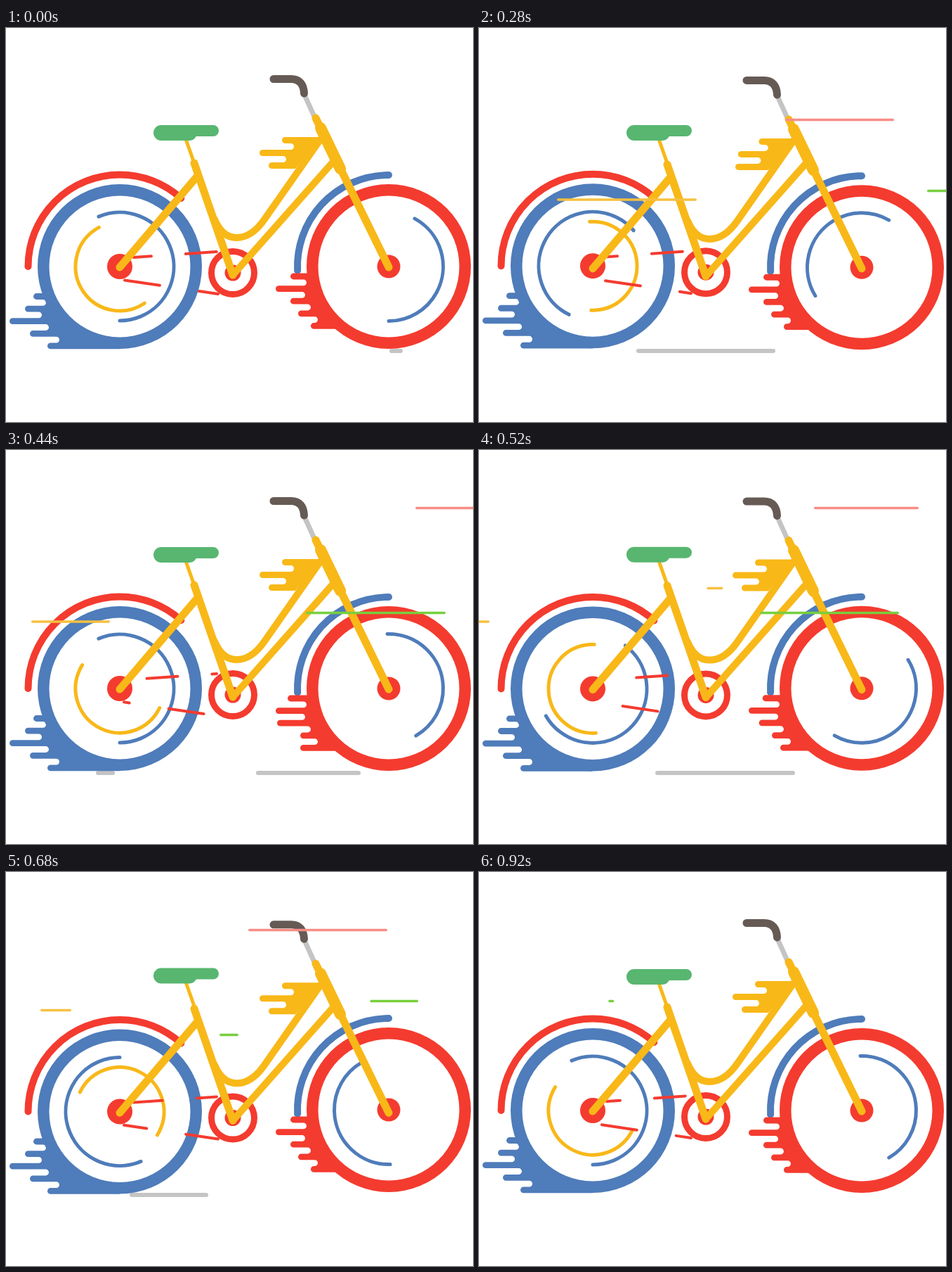
Recreate the animation shown at these times as an HTML page with a canvas. Size 665 px wide and 560 px high, loop 0.96 s.

```html
<!DOCTYPE html>
<html lang="en">
<head>
<meta charset="utf-8">
<title>Speeding bicycle</title>
<style>
  html, body { margin: 0; width: 100%; height: 100%; overflow: hidden; background: #fff; }
  canvas { display: block; }
</style>
</head>
<body>
<canvas width="665" height="560"></canvas>
<script>
const ctx = document.querySelector('canvas').getContext('2d');
const RED = '#f43b2f', BLUE = '#4f7cba', YELLOW = '#f8b818', GREEN = '#58b670',
      GREY = '#c4c4c4', DARK = '#665a55', PINK = '#f78d85', LIME = '#77cf3d', AMBER = '#f6c040';
const STEP = 40, STEPS = 24, HALF = 11, RAD = Math.PI / 180;
ctx.lineCap = ctx.lineJoin = 'round';

function stroke(color, width, path) {
  ctx.strokeStyle = color;
  ctx.lineWidth = width;
  ctx.stroke(new Path2D(path));
}

function arc(color, width, x, y, r, from, to) {
  ctx.beginPath();
  ctx.arc(x, y, r, from * RAD, to * RAD);
  ctx.strokeStyle = color;
  ctx.lineWidth = width;
  ctx.stroke();
}

function disc(color, x, y, r) {
  ctx.fillStyle = color;
  ctx.beginPath();
  ctx.arc(x, y, r, 0, 7);
  ctx.fill();
}

function shifted(dy, draw) {
  ctx.save();
  ctx.translate(0, dy);
  draw();
  ctx.restore();
}

// Piecewise linear value from [time, value] pairs
function at(keys, t) {
  let k = 1;
  while (k < keys.length - 1 && t > keys[k][0]) k++;
  const [t0, v0] = keys[k - 1], [t1, v1] = keys[k];
  return v0 + (v1 - v0) * (t - t0) / (t1 - t0);
}

const pulse = (i, centre, width) => Math.max(0, 1 - Math.abs(i - centre) / width);

// Block with ragged rounded fingers on its left side
function fingers(color, start, end, y, pitch, tips, notches) {
  const r = pitch / 4, q = Math.PI / 2;
  ctx.fillStyle = color;
  ctx.beginPath();
  ctx.moveTo(start, y - r);
  tips.forEach((tip, n) => {
    const cy = y + n * pitch;
    ctx.arc(tip + r, cy, r, -q, q, true);
    if (n < notches.length) ctx.arc(notches[n] - r, cy + pitch / 2, r, -q, q);
  });
  ctx.lineTo(end, y + (tips.length - 1) * pitch + r);
  ctx.fill();
}

function wheel(color, x, y) {
  disc(color, x, y, 117);
  disc('#fff', x, y, 100.5);
}

function chain(path, dash, offset) {
  ctx.setLineDash(dash);
  ctx.lineDashOffset = offset;
  stroke(RED, 4, path);
  ctx.setLineDash([]);
}

// Both ends of a streak as it grows, glides and shrinks
const HEAD = [[-1, 567], [1, 462], [3, 356], [4, 298], [5, 251], [7, 224], [9, 176], [11, 128], [11.6, 114]];
const TAIL = [[-1, 567], [0, 562], [1, 552], [3, 505], [5, 450], [7, 422], [9, 288], [11, 155], [11.6, 114]];
const LATE_HEAD = [[12, 400], [15, 173], [17, 49], [19, -60]];
const LATE_TAIL = [[12, 400], [15, 242], [17, 93], [19, -50]];

function streak(color, width, y, dx, t, head = HEAD, tail = TAIL) {
  if (t < head[0][0] || t > head[head.length - 1][0]) return;
  const a = at(head, t) + dx + width / 2, b = at(tail, t) + dx - width / 2;
  if (b > a) stroke(color, width, `M${a} ${y}H${b}`);
}

function rear(i, blueAngle) {
  const p = pulse(i, 3, 3);
  const tips = [39 - 12 * p, 27 + 9 * p, 5 + 9 * p, 34 - 20 * p, 59 - 9 * p];
  const notches = [57 - 4 * p, 51 + 7 * p, 61 - 2 * p, 76 + 9 * p];
  arc(RED, 10, 162, 339, 130.5, 180, 312);
  fingers(BLUE, 70, 162, 381.5, 17.6, tips, notches);
  wheel(BLUE, 162, 339);
  arc(BLUE, 5, 162, 339, 77, blueAngle, blueAngle + 203);
  arc(YELLOW, 5, 162, 339, 63, 56 + 30 * i, 242 + 30 * i);
  chain('M182 326L300 318', [44, 49], -74 - 11.87 * i);
  chain('M168 358.3L302 378', [50.5, 56.5], -108 + 13.7 * i);
  disc(RED, 162, 339, 18);
  arc(RED, 9, 323, 348, 30.5, 0, 360);
  disc(RED, 323, 348, 11.5);
}

function front(i) {
  const p = pulse(i, 3, 3), q = pulse(i, 11, 3), turn = 30 * i - 61.5;
  const tips = [405 + 6 * p - 4 * q, 384 + 6 * p, 405 - 10 * p - 19 * q,
                416 - 6 * p + 3 * q, 434 - 4 * p - 15 * q];
  arc(BLUE, 10, 545, 339, 130, 177.5, 270);
  fingers(RED, 440, 480, 353, 17.6, tips, [428, 426, 434, 444]);
  wheel(RED, 545, 339);
  arc(BLUE, 5, 545, 339, 77.5, turn, turn + 151.5);
  disc(RED, 545, 339, 16.5);
}

function seat() {
  stroke(YELLOW, 5, 'M256 158L268 192');
  ctx.fillStyle = GREEN;
  ctx.beginPath();
  ctx.roundRect(210, 138, 62, 22, 11);
  ctx.roundRect(215, 138, 88, 16, 8);
  ctx.fill();
}

function frame(i) {
  const p = pulse(i, 5, 5);
  fingers(YELLOW, 450, 412, 159.5, 18, [393 + 9 * p, 361 + 13 * p, 374 - 15 * p], [410 + 3 * p, 399 + 4 * p]);
  stroke(GREY, 7, 'M425 95L440 128');
  stroke(DARK, 11, 'M381 72.5H406C418 72.5 424 80 424.5 93');
  stroke(YELLOW, 10, 'M448 158L368 272Q350 298 328 298Q308 298 297 272');
  stroke(YELLOW, 10, 'M466 190L323 351');
  stroke(YELLOW, 11, 'M268 192L323 351M162 340L272 211M441 128L545 340');
  stroke(YELLOW, 16, 'M448 142L476 200');
}

function draw(i) {
  const first = i < HALF;
  const phase = first ? i / HALF : (i - HALF) / (STEPS - 1 - HALF);
  const bob = Math.sin(Math.PI * phase) ** 2;

  ctx.clearRect(0, 0, 665, 560);
  streak(GREY, 6, 459, 0, i - 0.6 * Math.max(0, Math.min(1, (7 - i) / 4)));
  streak(GREY, 6, 459, 0, i - 8);

  shifted(bob * (first ? -1 : 1.5), () => rear(i, -113 + 360 * phase));
  shifted(bob * (first ? 1.5 : -1), () => front(i));
  shifted(bob * (first ? 0 : -1.5), seat);
  shifted(bob * 2.3, () => frame(i));

  streak(PINK, 3.4, 130.5, 236, i + 1);
  streak(AMBER, 3.4, 244, -140, i - 2);
  streak(LIME, 3.4, 231.5, 176, i - 6);
  streak(PINK, 3.4, 82.5, 121, i - 10);
  streak(AMBER, 3.4, 196.5, 0, i, LATE_HEAD, LATE_TAIL);
  streak(LIME, 3.4, 183.5, 30 + 6 * (i - 17), 0.5 + 1.82 * (i - 17));
}

function tick(now) {
  draw(Math.floor(now / STEP) % STEPS);
  requestAnimationFrame(tick);
}
requestAnimationFrame(tick);
</script>
</body>
</html>
```
